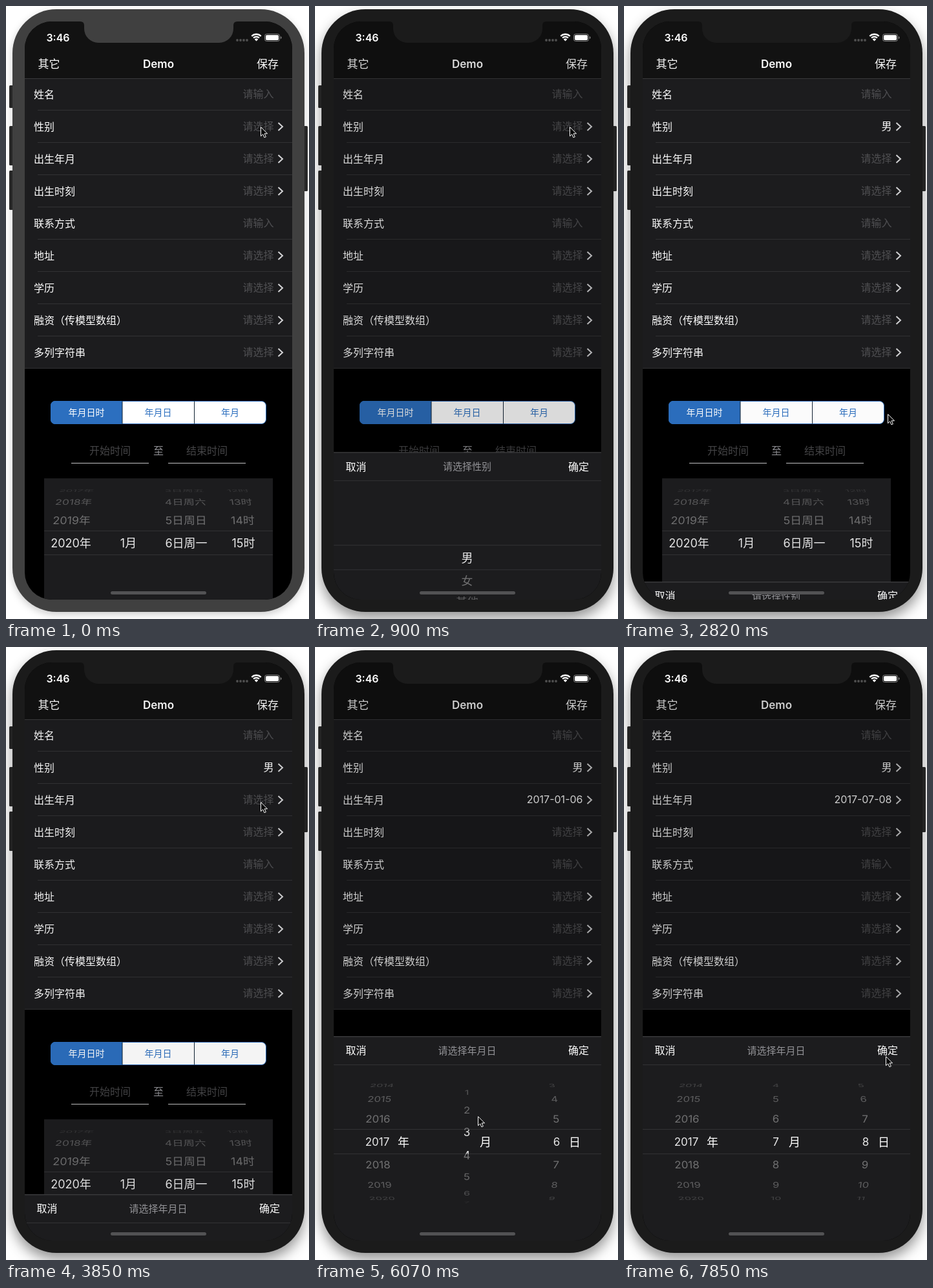
Recreate the animation shown at these times as an HTML page. Size 469 by 950 pixels, loop 8000 ms.

```html
<!DOCTYPE html>
<html lang="zh-CN">
<head>
<meta charset="utf-8">
<title>Form picker demo</title>
<style>
  html, body { margin: 0; width: 100%; height: 100%; overflow: hidden; background: #fff; }
  svg { display: block; width: 469px; height: 950px; }
  text { font-family: Inter, "Noto Sans CJK SC", "Noto Sans CJK", sans-serif; fill: #fff; white-space: pre; }
  .shell { fill: #404040; }
  .key { fill: #2b2b2b; }
  #body { filter: drop-shadow(0 4px 6px rgba(0, 0, 0, .2)); }
  .active .shell { fill: #1b1b1b; }
  .active #body { filter: drop-shadow(0 10px 10px rgba(0, 0, 0, .42)); }
</style>
</head>
<body>
<svg id="stage" viewBox="0 0 469 950"></svg>
<script>
const LOOP = 8000, TICKS = 54, STEP = LOOP / TICKS;
const MID = 236, SHEET_TOP = 604, SHEET_H = 316;
const PANEL = '#1c1c1e', LINE = '#323234', BLUE = '#2c6fbf', HINT = '#505053';

// Sheet slides: [start ms, shown amount before, after]
const SLIDES = [[693.3, 0, 1], [2568.8, 1, 0], [3759.8, 0, 1]];
const SLIDE_MS = 300;

// Key tables: [tick, value...]
const CURSOR = [
  [7, 394, 187], [11, 418, 420], [14, 438, 600], [17, 408, 632], [19, 408, 632],
  [20, 404, 556], [24, 394, 240], [27, 394, 240], [33, 101, 706], [37, 104, 812],
  [39, 248, 812], [41, 252, 727], [43, 250, 690], [46, 372, 790], [49, 378, 720],
  [51, 446, 690], [53, 405, 634]
];
const YEAR = [[33, 2020], [37, 2017]];
const MONTH = [[39, 1], [41, 3.43], [45, 7]];
const DAY = [[46, 6], [50, 8]];
const BIRTH = [[38, '2017-01-06'], [46, '2017-07-06'], [50, '2017-07-08']];

const ROWS = ['姓名', '性别', '出生年月', '出生时刻', '联系方式', '地址', '学历', '融资（传模型数组）', '多列字符串'];
const isInput = i => i === 0 || i === 4;

const rect = (x, y, w, h, fill, extra = '') =>
  `<rect x="${x}" y="${y}" width="${w}" height="${h}" fill="${fill}" ${extra}/>`;

// Text centred vertically on y
const text = (s, x, y, size, anchor = 'middle', fill = '#fff', extra = '') =>
  `<text x="${x}" y="${y + size * .37}" font-size="${size}" text-anchor="${anchor}" style="fill:${fill}" ${extra}>${s}</text>`;

const range = (a, b) => Array.from({ length: b - a + 1 }, (_, i) => a + i);

function at(keys, t) {
  if (t <= keys[0][0]) return keys[0].slice(1);
  for (let i = 1; i < keys.length; i++) {
    const a = keys[i - 1], b = keys[i];
    if (t <= b[0]) {
      const p = (t - a[0]) / (b[0] - a[0]);
      return a.slice(1).map((v, j) => v + (b[j + 1] - v) * p);
    }
  }
  return keys[keys.length - 1].slice(1);
}

function slideAt(ms) {
  let shown = 0;
  for (const [start, from, to] of SLIDES) {
    if (ms < start) break;
    const x = Math.min(1, (ms - start) / SLIDE_MS);
    shown = from + (to - from) * x * x * (3 - 2 * x);
  }
  return shown;
}

// One column on a drum; pos is the index facing the viewer
function column({ items, pos, x, size }, radius, angle) {
  let dim = '', lit = '';
  items.forEach((label, i) => {
    const th = (i - pos) * angle;
    if (Math.abs(th) > 1.48) return;
    const c = Math.cos(th), s = Math.sin(th);
    const zoom = 1 - .09 * (1 - c), off = x - MID;
    const m = [zoom, 0, -.09 * off * s / radius, c, MID + off * zoom, radius * s].map(v => v.toFixed(4));
    const glyphs = text(label, 0, 0, size, 'middle', '#fff', `transform="matrix(${m})"`);
    dim += `<g opacity="${(.4 * c).toFixed(3)}">${glyphs}</g>`;
    if (Math.abs(i - pos) < 1.2) lit += glyphs;
  });
  return [dim, lit];
}

function picker(cols, radius, angle) {
  const parts = cols.map(c => column(c, radius, angle));
  return `<g clip-path="url(#offBand)">${parts.map(p => p[0]).join('')}</g>
    <g clip-path="url(#inBand)" opacity=".9">${parts.map(p => p[1]).join('')}</g>`;
}

function navBar() {
  return rect(29, 24, 414, 88, '#121212') + rect(29, 112, 414, 1, '#3a3a3c') +
    text('其它', 49.5, 90, 17, 'start') +
    text('Demo', MID, 90, 17, 'middle', '#fff', 'font-weight="600"') +
    text('保存', 422, 90, 17, 'end');
}

function formRows() {
  let out = rect(29, 113, 414, 449, PANEL);
  ROWS.forEach((name, i) => {
    const y = 137 + 50 * i, last = i === ROWS.length - 1;
    out += text(name, 43, y, 16, 'start') +
      text(isInput(i) ? '请输入' : '请选择', 414.5, y - .5, 16, 'end', HINT, `id="v${i}"`) +
      rect(last ? 29 : 49, y + 24, last ? 414 : 394, 1, LINE);
    if (!isInput(i)) out += `<path d="M421.5 ${y - 6}l6.5 6l-6.5 6" fill="none" stroke="#d4d4d6" stroke-width="2"/>`;
  });
  return out;
}

function segments() {
  return rect(69.5, 612.5, 333, 35, '#fff', `rx="7" stroke="${BLUE}"`) +
    `<path d="M180 612H76a7 7 0 0 0-7 7v22a7 7 0 0 0 7 7h104z" fill="${BLUE}"/>` +
    rect(179.5, 612.5, 1, 35, '#123') + rect(291, 612.5, 1, 35, '#123') +
    text('年月日时', 124.5, 630, 14) +
    text('年月日', 235.5, 630, 14, 'middle', BLUE) +
    text('年月', 347, 630, 14, 'middle', BLUE);
}

function period() {
  const field = (label, x) => text(label, x, 689.5, 16, 'middle', '#454547') + rect(x - 60, 708, 120, 1, '#c4c4c6');
  const cols = [
    { items: ['2017年', '2018年', '2019年', '2020年'], pos: 3, x: 100.5, size: 18 },
    { items: ['1月'], pos: 0, x: 189.5, size: 18 },
    { items: ['3日周五', '4日周六', '5日周日', '6日周一'], pos: 3, x: 279, size: 18 },
    { items: ['12时', '13时', '14时', '15时'], pos: 3, x: 367.5, size: 18 }
  ];
  return field('开始时间', 161) + text('至', MID, 689.5, 16, 'middle', '#8c8c90') + field('结束时间', 311) +
    rect(59, 732, 354, 190, PANEL) + rect(59, 813, 354, 1, LINE) + rect(59, 850, 354, 1, LINE) +
    `<g transform="translate(0 832)">${picker(cols, 84, .43)}</g>`;
}

function statusBar() {
  const arc = r => `M${387.5 - r * .72} ${54 - r * .72}A${r} ${r} 0 0 1 ${387.5 + r * .72} ${54 - r * .72}`;
  const dots = range(0, 3).map(i => `<circle cx="${358 + i * 5}" cy="53" r="1.9" fill="#505050"/>`).join('');
  return text('3:46', 80.5, 49, 16, 'middle', '#fff', 'font-weight="600"') + dots +
    `<path d="${arc(10)}${arc(6.2)}" fill="none" stroke="#fff" stroke-width="2.3"/>
     <path d="M387.5 54.5l-2.8-2.8a4 4 0 0 1 5.6 0z" fill="#fff"/>` +
    rect(400.5, 43.5, 23, 11, 'none', 'rx="3" stroke="#8a8a8a"') +
    rect(402, 45, 20, 8, '#fff', 'rx="1.8"') +
    '<path d="M425 47q1.6.6 1.6 2t-1.6 2z" fill="#8a8a8a"/>';
}

const key = (x, y, h) => rect(x, y, 8, h, '', 'rx="1.5" class="key"').replace('fill="" ', '');

stage.innerHTML = `
  <defs>
    <clipPath id="screen"><rect x="29" y="24" width="414" height="896" rx="42"/></clipPath>
    <clipPath id="inBand"><rect x="0" y="-18.5" width="469" height="37"/></clipPath>
    <clipPath id="offBand"><path d="M0-110H469V-18.5H0zM0 18.5H469V110H0z"/></clipPath>
  </defs>
  ${key(5, 123, 35)}${key(5, 186, 61)}${key(5, 255, 61)}${key(459, 186, 101)}
  <rect id="body" class="shell" x="10" y="5" width="452" height="934" rx="68"/>
  <g clip-path="url(#screen)">
    ${rect(29, 24, 414, 896, '#000')}
    ${navBar()}${formRows()}${segments()}${period()}
    ${rect(29, 24, 414, 896, '#000', 'id="shade"')}
    <g id="sheet">
      ${rect(29, 0, 414, SHEET_H + 4, PANEL)}${rect(29, -1, 414, 1.5, '#39393b')}${rect(29, 43, 414, 1, LINE)}
      ${text('取消', 47.5, 21.5, 16, 'start')}${text('', 235.5, 21.5, 15, 'middle', '#949498', 'id="title"')}
      ${text('确定', 424, 21.5, 16, 'end')}
      <g transform="translate(0 163)">
        ${rect(29, -20, 414, 1, LINE)}${rect(29, 18, 414, 1, LINE)}
        <g id="wheel"></g>
      </g>
    </g>
    ${statusBar()}
    ${rect(162, 907, 148, 5, '#525254', 'rx="2.5"')}
  </g>
  <path class="shell" d="M115 23v1q6 0 6 6v5a22 22 0 0 0 22 22h187a22 22 0 0 0 22-22v-5q0-6 6-6v-1z"/>
  <path id="cursor" d="M.5.7v14l3.2-3l2.2 5.1l2.4-1l-2.2-5h4.4z" fill="#000" stroke="#fff" stroke-linejoin="round"/>`;

const $ = id => document.getElementById(id);

function setValue(row, value) {
  const el = $('v' + row);
  el.textContent = value || '请选择';
  el.style.fill = value ? '#fff' : HINT;
}

function dateWheel(tick) {
  const past = tick >= 38;
  const years = range(2000, 2020), [y] = at(YEAR, tick), [m] = at(MONTH, tick), [d] = at(DAY, tick);
  const cols = [
    { items: years, pos: y - 2000, x: 96.5, size: 17 },
    { items: range(1, past ? 12 : 1), pos: m - 1, x: 235, size: 17 },
    { items: range(1, past ? 31 : 6), pos: d - 1, x: 374, size: 17 }
  ];
  return picker(cols, 96, .38) + text('年', 137, 0, 18) + text('月', 264, 0, 18) + text('日', 402, 0, 18);
}

const genderWheel = () => picker([{ items: ['男', '女', '其他'], pos: 0, x: 235.5, size: 18 }], 96, .38);

function draw(tick) {
  const shown = slideAt(tick * STEP), gender = tick < 22;
  stage.classList.toggle('active', tick >= 2);
  $('shade').setAttribute('opacity', .2 * shown);
  $('sheet').setAttribute('transform', `translate(0 ${(SHEET_TOP + SHEET_H * (1 - shown)).toFixed(2)})`);
  $('sheet').style.display = shown ? '' : 'none';
  $('title').textContent = gender ? '请选择性别' : '请选择年月日';
  $('wheel').innerHTML = gender ? genderWheel() : dateWheel(tick);
  setValue(1, tick >= 18 ? '男' : '');
  const birth = BIRTH.filter(b => tick >= b[0]).pop();
  setValue(2, birth && birth[1]);
  const [x, y] = at(CURSOR, tick);
  $('cursor').setAttribute('transform', `translate(${Math.round(x)} ${Math.round(y)})`);
}

let last = -1;
function loop() {
  const t = performance.now() % LOOP;
  const tick = Math.min(TICKS - 1, Math.floor((t + 10) / STEP));
  if (tick !== last) draw(last = tick);
  requestAnimationFrame(loop);
}
loop();
</script>
</body>
</html>
```
